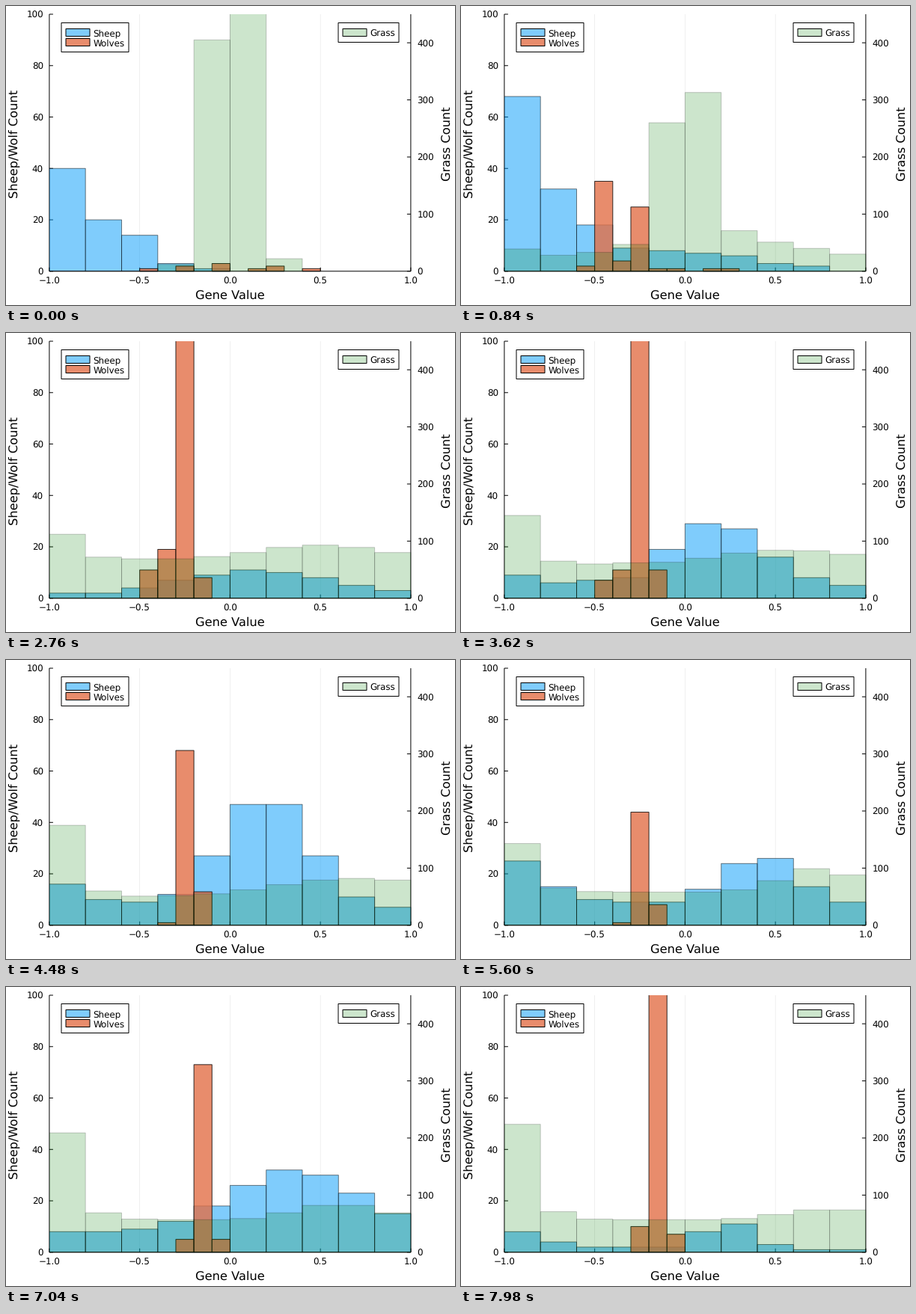
A matplotlib script that plays this animation: 600x400 px, repeating every 8000 ms.

```python
import numpy as np
import matplotlib.pyplot as plt
from matplotlib.animation import FuncAnimation
from matplotlib.patches import Rectangle

W, H, DPI = 600, 400, 100
FRAMES, STEP = 400, 20
LEFT, RIGHT, TOP, BOTTOM = 57.9, 540.9, 11.0, 354.8
PX = 72 / DPI
SHEEP, WOLF, GRASS = ("#009afa", 0.5), ("#e36f47", 0.8), ("#008000", 0.2)
KEYS = [0, 84, 138, 224, 280, 352, 399]

plt.rcParams.update({"font.family": "DejaVu Sans", "path.snap": False,
                     "text.hinting": "none"})
rng = np.random.default_rng(4)
bins = np.arange(10)
wolf_bins = np.arange(11)


def hump(x, height, centre, width):
    return height * np.exp(-((x - centre) / width) ** 2)


def spread(decay, base, edge, *top):
    """Level ground, a crowd at the lowest gene and one hump, per bin."""
    return base + edge * np.exp(-bins / decay) + hump(bins, *top)


def packs(*peaks):
    return sum(hump(wolf_bins, n, centre, 0.6) for n, centre in peaks)


def history(shapes):
    """Counts for every frame: a trend plus a small walk pinned at the key times."""
    t = np.arange(FRAMES)
    columns = []
    for values in np.array(shapes, float).T:
        trend = np.maximum(0, np.interp(t, KEYS, values))
        walk = np.cumsum(rng.normal(0, 0.04, FRAMES))
        walk -= np.interp(t, KEYS, walk[KEYS])
        columns.append(np.maximum(0, np.round(trend + walk * np.sqrt(trend))))
    return np.array(columns).T


# base, edge crowd, hump height, hump centre, hump width
sheep = [spread(1.2, *p) for p in (
    (-0.6, 40.6, 8, 1.7, 0.7),
    (-1, 98, 13, 5, 3),
    (0, 1, 11, 5.3, 3.2),
    (6, 10, 45, 5.5, 1.7),
    (7, 18, 20, 6.6, 1.5),
    (8, 0, 24, 6.3, 2.4),
    (1, 7, 11, 5.7, 1.0),
)]
grass = [spread(0.4, *p) for p in (
    (0, 0, 678, 4.56, 0.78),
    (36, 40, 89, 5.3, 3.2),
    (68, 44, 25, 7, 2.3),
    (50, 125, 32, 8, 3),
    (58, 85, 42, 8.2, 1.4),
    (57, 152, 28, 7.5, 1.6),
    (57, 167, 19, 8.5, 1.7),
)]
first_wolves = np.bincount([1, 3, 3, 5, 5, 5, 7, 8, 8, 10])
wolves = [first_wolves] + [packs(*p) for p in (
    [(71, 1), (50, 3)],
    [(22, 1.5), (135, 3)],
    [(76, 3.2)],
    [(49, 3.2)],
    [(73, 4)],
    [(130, 3.97)],
)]


def px(gene):
    return LEFT + (gene + 1) / 2 * (RIGHT - LEFT)


def py(count, top=100):
    return BOTTOM - count / top * (BOTTOM - TOP)


fig = plt.figure(figsize=(W / DPI, H / DPI), dpi=DPI, facecolor="white")
ax = fig.add_axes([0, 0, 1, 1])
ax.set_xlim(0, W)
ax.set_ylim(H, 0)
ax.axis("off")


def line(x0, y0, x1, y1, z=1, width=1, **kw):
    ax.plot([x0, x1], [y0, y1], color="black", lw=width * PX, zorder=z,
            solid_capstyle="butt", **kw)


def label(x, y, text, size=11.9, **kw):
    kw = {"ha": "center", "va": "baseline", **kw}
    ax.text(x, y, text, fontsize=size * PX, zorder=12, **kw)


def box(x0, y0, x1, y1, z, **kw):
    rect = Rectangle((x0, y0), x1 - x0, y1 - y0, lw=PX, zorder=z, **kw)
    return ax.add_patch(rect)


def draw_axes():
    for gene in (-0.5, 0, 0.5):
        line(px(gene), TOP, px(gene), BOTTOM, z=0.5, width=0.6, alpha=0.1)
    line(LEFT, TOP, LEFT, BOTTOM)
    line(RIGHT, TOP, RIGHT, BOTTOM)
    line(LEFT, BOTTOM, RIGHT, BOTTOM, z=4)
    for gene in (-1, -0.5, 0, 0.5, 1):
        line(px(gene), BOTTOM, px(gene), BOTTOM - 5)
        label(px(gene), 372, f"{gene:.1f}".replace("-", "\u2212"))
    for n in range(0, 101, 20):
        line(LEFT, py(n), LEFT + 5, py(n))
        label(50, py(n) + 5.2, str(n), ha="right")
    for n in range(0, 401, 100):
        y = py(n, 450)
        line(RIGHT - 5, y, RIGHT, y)
        label(549.4, y + 5.2, str(n), ha="left")
    side = dict(size=16.3, rotation=90, rotation_mode="anchor")
    label(299.5, 392, "Gene Value", size=16.3)
    label(16, 184, "Sheep/Wolf Count", **side)
    label(594.6, 184, "Grass Count", **side)


def legend(x0, x1, entries):
    y0 = 22.5
    box(x0, y0, x1, y0 + 13 * (len(entries) + 1), 10, fc="white", ec="black")
    for i, (name, (color, alpha)) in enumerate(entries):
        y = y0 + 8 + 13 * i
        box(x0 + 6, y, x0 + 38, y + 10, 11, fc=(color, alpha), ec="black")
        label(x0 + 42.4, y + 10, name, ha="left")


plot_area = Rectangle((58, 11), 483.5, 345, transform=ax.transData)


class Histogram:
    def __init__(self, shapes, start, width, style, z, top=100):
        self.counts = history(shapes)
        self.top = top
        self.bars = []
        color, alpha = style
        for i in range(self.counts.shape[1]):
            x = start + i * width
            bar = box(px(x), BOTTOM, px(x + width), BOTTOM, z,
                      fc=color, ec="black", alpha=alpha)
            bar.set_clip_path(plot_area)
            self.bars.append(bar)

    def show(self, frame):
        for bar, n in zip(self.bars, self.counts[frame]):
            bar.set_height(py(n, self.top) - BOTTOM)
            bar.set_visible(n > 0)


draw_axes()
legend(74, 164, [("Sheep", SHEEP), ("Wolves", WOLF)])
legend(444, 525, [("Grass", GRASS)])
charts = [
    Histogram(sheep, -1, 0.2, SHEEP, 2),
    Histogram(wolves, -0.6, 0.1, WOLF, 3),
    Histogram(grass, -1, 0.2, GRASS, 5, top=450),
]


def update(frame):
    for chart in charts:
        chart.show(frame)
    return [bar for chart in charts for bar in chart.bars]


anim = FuncAnimation(fig, update, frames=FRAMES, interval=STEP,
                     init_func=lambda: update(0), repeat=True, repeat_delay=0)
plt.show()
```
